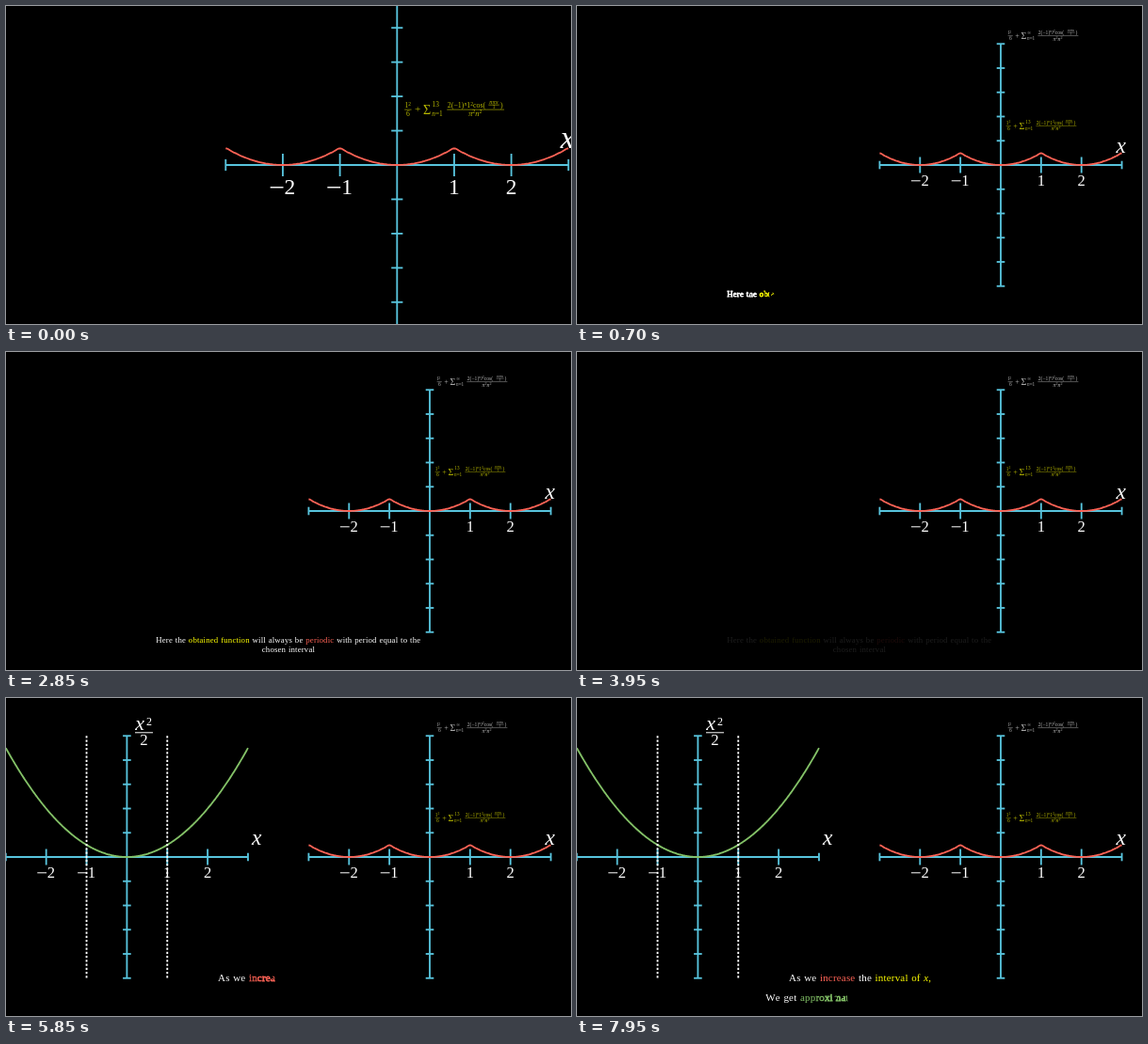
Animation of 600x338 px, one loop 8000 ms. Source, as an HTML page with a canvas:

```html
<!DOCTYPE html>
<html lang="en">
<head>
<meta charset="utf-8">
<title>Periodic series</title>
<style>
  html, body { margin: 0; width: 100%; height: 100%; overflow: hidden; background: #000; }
  canvas { display: block; }
</style>
</head>
<body>
<canvas id="stage" width="600" height="338"></canvas>
<script>
const ctx = document.getElementById('stage').getContext('2d');
const LOOP = 8;
const WHITE = '#fff', BLUE = '#58c4dd', RED = '#fc6255', GREEN = '#83c167', YELLOW = '#ffff00';
const SERIF = '"Liberation Serif", "Times New Roman", serif';
const UX = 42.86, UY = 25.75, CY = 169;     // axis units and the height of the x axis
const LEFT = 128.4, RIGHT = 450;            // origins of the two plots
const STROKE = 1.85;
let zoom = 1;

const clamp = v => Math.min(1, Math.max(0, v));
const sigmoid = v => 1 / (1 + Math.exp(-v));
function smooth(a) {
  const e = sigmoid(-5);
  return clamp((sigmoid(10 * (clamp(a) - 0.5)) - e) / (1 - 2 * e));
}

const font = (size, italic) => `${italic ? 'italic ' : ''}${size}px ${SERIF}`;

function text(str, x, y, size, color, italic = false, align = 'left') {
  ctx.font = font(size, italic);
  ctx.fillStyle = color;
  ctx.textAlign = align;
  ctx.fillText(str, x, y);
  return ctx.measureText(str).width;
}

// Lines keep their weight on screen while the camera zooms.
function path(points, color, width = STROKE) {
  ctx.beginPath();
  points.forEach(([x, y]) => ctx.lineTo(x, y));
  ctx.strokeStyle = color;
  ctx.lineWidth = width / zoom;
  ctx.stroke();
}

function plot(ox, fn, color) {
  const pts = [];
  for (let i = -150; i <= 150; i++) {
    const x = i / 50;
    pts.push([ox + x * UX, CY - fn(x) * UY]);
  }
  ctx.lineJoin = 'round';
  path(pts, color);
}

function axes(ox) {
  path([[ox - 3 * UX, CY], [ox + 3 * UX, CY]], BLUE);
  path([[ox, CY - 5 * UY], [ox, CY + 5 * UY]], BLUE);
  for (let i = -5; i <= 5; i++) {
    if (!i) continue;
    const y = CY + i * UY;
    path([[ox - 4.3, y], [ox + 4.3, y]], BLUE);
    if (Math.abs(i) > 3) continue;
    const x = ox + i * UX, half = Math.abs(i) === 3 ? 4.3 : 8.5;
    path([[x, CY - half], [x, CY + half]], BLUE);
    if (Math.abs(i) === 3) continue;
    if (i < 0) path([[x - 9.4, 185.8], [x + 0.4, 185.8]], WHITE, zoom);
    text(Math.abs(i), i < 0 ? x + 5.3 : x, 190.9, 16.6, WHITE, false, 'center');
  }
}

const parabola = x => x * x / 2;
function series(x) {
  let sum = 1 / 6;
  for (let n = 1; n <= 13; n++) {
    sum += 2 * (n % 2 ? -1 : 1) * Math.cos(n * Math.PI * x) / (Math.PI * n) ** 2;
  }
  return sum;
}

// Each part is [string, italic, raised].
function run(parts, x, y, size, color) {
  for (const [str, italic, raised] of parts) {
    x += text(str, x, raised ? y - size * 0.34 : y, raised ? size * 0.7 : size, color, italic);
  }
}

function formula(dx, dy, color, period, top) {
  const letter = period === 'l';
  const bar = (x0, x1, y) => path([[x0, y], [x1, y]], color, 0.45 * zoom);
  ctx.save();
  ctx.globalAlpha = 0.72;
  ctx.translate(dx, dy);
  run([[period, letter], ['2', false, true]], 455.8, 126.2, 5.4, color);
  bar(455.6, 460.8, 127.4);
  text('6', 456.9, 132.2, 5.4, color);
  text('+', 465.5, 129.6, 8, color, false, 'center');
  text('Σ', 469.6, 130.9, 10, color);
  text(top, 476.3, 125.4, 5.2, color);
  run([['n', true], ['=1']], 476.1, 132.2, 5.2, color);
  bar(487.4, 530.4, 127.4);
  run([['2(−1)'], ['n', true, true], [period, letter], ['2', false, true], ['cos(']],
    487.8, 126.2, 5.6, color);
  text('nπx', 522.6, 123.1, 4.6, color, true, 'center');
  bar(518.6, 526.6, 123.9);
  text(period, 522.6, 126.9, 3.8, color, letter, 'center');
  text(')', 527.6, 126.2, 5.6, color);
  run([['π', true], ['2', false, true], ['n', true], ['2', false, true]], 503.6, 132.4, 5.9, color);
  ctx.restore();
}

function rightPlot() {
  axes(RIGHT);
  plot(RIGHT, series, RED);
  text('x', 572.6, 156, 23.5, WHITE, true);
  formula(0, 0, YELLOW, '1', '13');
  formula(2, -95.8, WHITE, 'l', '∞');
}

function leftPlot() {
  axes(LEFT);
  plot(LEFT, parabola, GREEN);
  ctx.setLineDash([2.3, 1.95]);
  for (const side of [-1, 1]) {
    const x = LEFT + side * UX;
    path([[x, CY - 5 * UY], [x, CY + 5 * UY]], WHITE);
  }
  ctx.setLineDash([]);
  text('x', 261, 156, 23.5, WHITE, true);
  text('x', 137.3, 34.4, 22, WHITE, true);
  text('2', 149, 29, 12, WHITE);
  path([[137, 36.8], [156, 36.8]], WHITE, 1);
  text('2', 146.4, 49.6, 16.8, WHITE, false, 'center');
}

// Outline grows first, then thins out while the fill appears.
function glyph(ch, x, y, size, color, a) {
  if (a <= 0) return;
  const alpha = ctx.globalAlpha, fill = clamp(2 * a - 1);
  ctx.fillStyle = ctx.strokeStyle = color;
  if (fill < 1) {
    ctx.lineWidth = 0.84 * (1 - fill);
    ctx.setLineDash(a < 0.5 ? [2 * a * 4.5 * size, 100] : []);
    ctx.strokeText(ch, x, y);
    ctx.setLineDash([]);
  }
  ctx.globalAlpha = alpha * fill;
  if (fill > 0) ctx.fillText(ch, x, y);
  ctx.globalAlpha = alpha;
}

// Writes lines letter by letter over two seconds; count is the letters in the sentence.
function write(lines, size, count, time) {
  const lag = 4 / (count + 1), span = 2 / (1 + (count - 1) * lag);
  let index = 0;
  ctx.textAlign = 'left';
  for (const { x: start, y, runs } of lines) {
    let x = start;
    for (const [str, color, italic] of runs) {
      ctx.font = font(size, italic);
      for (const ch of str) {
        if (ch === ' ') { x += size * 0.323; continue; }
        glyph(ch, x, y, size, color, clamp(time / span - index * lag));
        x += ctx.measureText(ch).width + size * 0.017;
        index++;
      }
    }
  }
}

const PERIODIC = [
  { x: 159.3, y: 308.8, runs: [['Here the ', WHITE], ['obtained function', YELLOW],
    [' will always be ', WHITE], ['periodic', RED], [' with period equal to the', WHITE]] },
  { x: 271.8, y: 318.8, runs: [['chosen interval', WHITE]] }
];
const INCREASE = [
  { x: 225, y: 300.8, runs: [['As we ', WHITE], ['increase', RED], [' the ', WHITE],
    ['interval of ', YELLOW], ['x', YELLOW, true], [',', YELLOW]] }
];
const APPROXIMATE = [
  { x: 200.2, y: 322, runs: [['We get ', WHITE], ['approximation', GREEN]] }
];

function draw(t) {
  ctx.setTransform(1, 0, 0, 1, 0, 0);
  ctx.globalAlpha = 1;
  ctx.fillStyle = '#000';
  ctx.fillRect(0, 0, 600, 338);

  const rest = 2 * (1 - smooth(t + 0.5));
  zoom = 600 / (600 - 177 * rest);
  ctx.translate(300, 169);
  ctx.scale(zoom, zoom);
  ctx.translate(-300 - 68.9 * rest, -169);
  rightPlot();

  if (t > 0.48 && t < 4.25) {
    ctx.globalAlpha = 1 - smooth(t - 3.25);
    write(PERIODIC, 8.8, 77, t - 0.48);
  }
  if (t > 4.25) {
    ctx.globalAlpha = smooth(t - 4.25);
    leftPlot();
    ctx.globalAlpha = 1;
  }
  if (t > 5.25) write(INCREASE, 11, 27, t - 5.25);
  if (t > 7.25) write(APPROXIMATE, 11, 34, t - 7.25);
}

const begin = performance.now();
function tick() {
  draw((performance.now() - begin) / 1000 % LOOP);
  requestAnimationFrame(tick);
}
tick();
</script>
</body>
</html>
```
